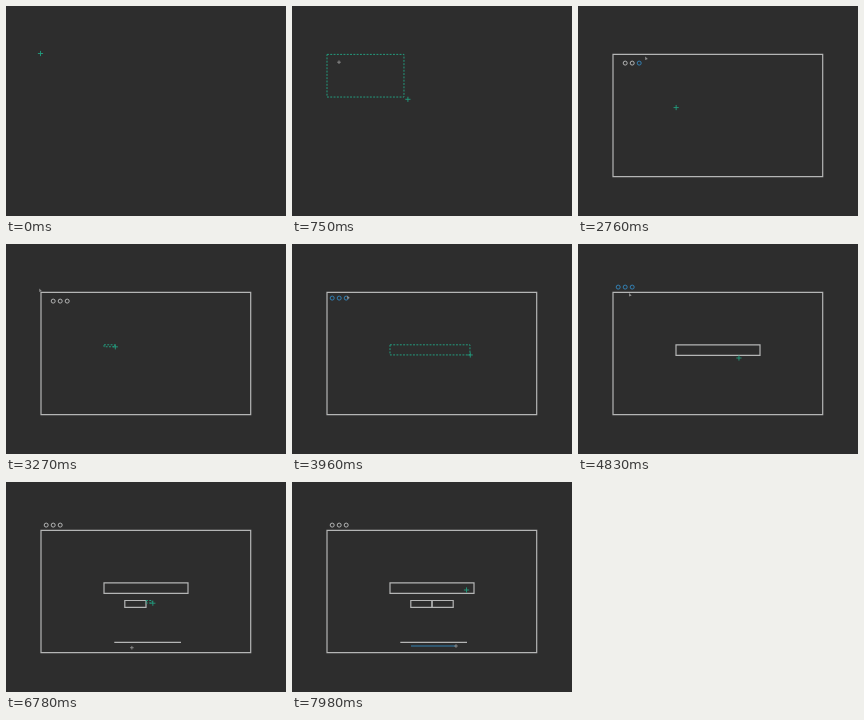
Write an HTML page with a canvas that moves like this. It is 280 px wide and 210 px high and loops after 8000 ms.

```html
<!DOCTYPE html>
<html lang="en">
<head>
<meta charset="utf-8">
<title>Wireframe sketch</title>
<style>
  html, body { margin: 0; width: 100%; height: 100%; overflow: hidden; background: #2d2d2d; }
  canvas { display: block; width: 280px; height: 210px; }
</style>
</head>
<body>
<canvas id="stage" width="280" height="210"></canvas>
<script>
const LOOP = 8000;
const TRAVEL = 300;      // pen flight between two boxes
const SETTLE = 400;      // a finished box stays dashed this long
const GREEN = '#239c7e', BLUE = '#3381b4', WHITE = '#b4b5b5', GREY = '#8f8f8f';
const ctx = document.getElementById('stage').getContext('2d');

const ease = p => p < .5 ? 4 * p ** 3 : 1 - 4 * (1 - p) ** 3;
const progress = (t, { start, end }) => ease(Math.min(1, Math.max(0, (t - start) / (end - start))));

// A pen flies through eased legs; bend pulls the middle of a leg sideways.
class Pen {
  constructor(x, y) {
    this.origin = { x, y };
    this.legs = [];
  }
  go(x, y, start, end, bend = [0, 0]) {
    const from = this.legs.length ? this.legs[this.legs.length - 1].to : this.origin;
    this.legs.push({ from, to: { x, y }, start, end, bend });
    return this;
  }
  at(t) {
    const leg = this.legs.filter(({ start }) => start <= t).pop();
    if (!leg) return this.origin;
    const { from, to, bend } = leg;
    const u = progress(t, leg), arch = 4 * u * (1 - u);
    return {
      x: from.x + (to.x - from.x) * u + bend[0] * arch,
      y: from.y + (to.y - from.y) * u + bend[1] * arch
    };
  }
}

const frame = { x: 35, y: 48.4, w: 209.7, h: 122.3, start: 200, end: 1400 };
const search = { x: 98, y: 100.8, w: 84, h: 10.6, start: 2780, end: 4300 };
const button = { x: 118.8, y: 118.5, w: 21.2, h: 6.9, start: 5000, end: 6150 };
const twin = { ...button, x: button.x + button.w, start: 6500, end: 7150 };
const boxes = [frame, search, button, twin];

const boxPen = new Pen(34.5, 47.5);
boxes.forEach((box, i) => {
  if (i) boxPen.go(box.x, box.y + .7, box.start - TRAVEL, box.start);
  boxPen.go(box.x + box.w, box.y + box.h, box.start, box.end, [0, i ? 0 : -2]);
});
boxPen.go(174.5, 108, 7600, 7900);

const RADIUS = 2, GAP = 7;
const circles = [0, 1, 2].map(i => ({ i, start: 800 + 475 * i, end: 1125 + 475 * i }));
const lines = [
  { x: 108.3, y: 160.4, w: 66.7, start: 5400, end: 6300, solid: 6550 },
  { x: 119, y: 164, w: 45, start: 7000, end: 7950, solid: LOOP }
];
const grab = { x: 63, y: 56, start: 3600, end: 4110 };

const detailPen = new Pen(110, -5).go(47, 56.2, 0, 700);
circles.forEach(({ i, start, end }) => detailPen.go(48 + GAP * i, 59, start, end));
detailPen
  .go(68, 52, 2350, 2760)
  .go(34, 46, 2760, 3300, [4, -34])
  .go(grab.x, grab.y, 3300, grab.start)
  .go(56, 53, grab.start, 3960)
  .go(56, 42, 3960, grab.end);
lines.forEach(({ x, y, w, start, end }, i) => detailPen
  .go(x, y, start - 700, start, i ? [0, 5] : [-54, 52])
  .go(x + w, y, start, end));

function trace(color, width, build) {
  ctx.strokeStyle = color;
  ctx.lineWidth = width;
  ctx.beginPath();
  build();
  ctx.stroke();
}

function drawBox(box, t) {
  if (t < box.start) return;
  const done = t >= box.end + SETTLE;
  const pen = boxPen.at(Math.min(box.end, Math.max(box.start, t - 9)));
  const w = done ? box.w : pen.x - box.x;
  const h = done ? box.h : pen.y - box.y;
  if (w < .5) return;
  ctx.setLineDash(done ? [] : [1.9, 1.4]);
  trace(done ? WHITE : GREEN, done ? 1.2 : 1, () => ctx.rect(box.x, box.y, w, h));
  ctx.setLineDash([]);
}

function drawCircle(circle, t) {
  if (t <= circle.start) return;
  const { i, start, end } = circle;
  const grown = progress(t, circle);
  const held = detailPen.at(Math.min(t, grab.end));
  const dx = t < grab.start ? 0 : held.x - grab.x;
  const dy = t < grab.start ? 0 : held.y - grab.y;
  const x = 47.2 + (i ? GAP * (i - 1 + grown) : 0) + dx;
  const selected = t < end + (i < 2 ? 150 : 850) || (t > 3500 && t < 5800);
  trace(selected ? BLUE : WHITE, 1, () =>
    ctx.arc(x, 57.1 + dy, i ? RADIUS : RADIUS * grown, 0, Math.PI * 2));
}

function drawLine(line, t) {
  const length = line.w * progress(t, line);
  if (length < 1.5) return;
  trace(t >= line.solid ? WHITE : BLUE, 1.2, () => {
    ctx.moveTo(line.x, line.y);
    ctx.lineTo(line.x + length, line.y);
  });
}

function drawPlus({ x, y }, arm, color) {
  trace(color, .9, () => {
    ctx.moveTo(x - arm, y);
    ctx.lineTo(x + arm, y);
    ctx.moveTo(x, y - arm);
    ctx.lineTo(x, y + arm);
  });
}

function drawArrow({ x, y }) {
  ctx.fillStyle = GREY;
  ctx.beginPath();
  ctx.moveTo(x - .8, y - 1.5);
  ctx.lineTo(x + 1.8, y + 1);
  ctx.lineTo(x - .8, y + 2);
  ctx.fill();
}

function draw(t) {
  ctx.fillStyle = '#2d2d2d';
  ctx.fillRect(0, 0, 280, 210);
  boxes.forEach(box => drawBox(box, t));
  circles.forEach(circle => drawCircle(circle, t));
  lines.forEach(line => drawLine(line, t));
  drawPlus(boxPen.at(t), 2.6, GREEN);
  const pointer = detailPen.at(t);
  if (t > circles[0].end && t < 5100) drawArrow(pointer);
  else drawPlus(pointer, 1.8, GREY);
}

const began = performance.now();
function tick() {
  draw((performance.now() - began) % LOOP);
  requestAnimationFrame(tick);
}
tick();
</script>
</body>
</html>
```
